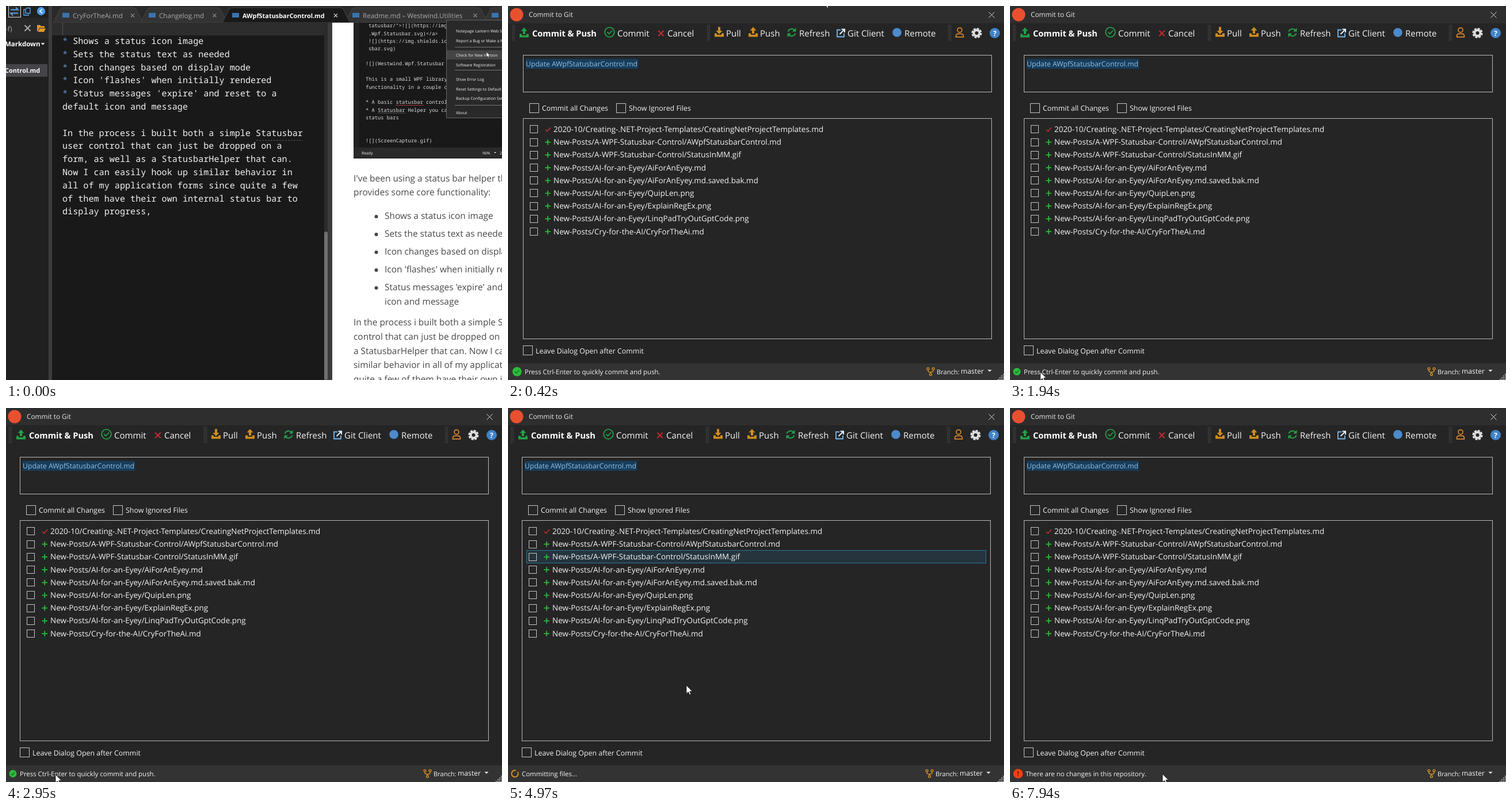
These frames come from a looping animation (862 px wide and 650 px high, 8000 ms). An HTML page:

```html
<!DOCTYPE html>
<html lang="en">
<head>
<meta charset="utf-8">
<title>Commit dialog</title>
<style>
  html, body { margin: 0; width: 100%; height: 100%; overflow: hidden; background: #252525; }
  svg { display: block; width: 100vw; height: 100vh; }
  text { font-family: "Open Sans", "Noto Sans", sans-serif; text-rendering: geometricPrecision; white-space: pre; }
  .mono { font-family: "Noto Sans Mono", "DejaVu Sans Mono", monospace; }
  .bold { font-weight: 700; }
</style>
</head>
<body>
<svg id="stage" viewBox="0 0 862 650"></svg>
<script>
const escapeText = s => s.replace(/&/g, '&amp;').replace(/</g, '&lt;');
const text = (x, y, s, size, fill = '#f4f4f4', cls = '') =>
  `<text x="${x}" y="${y}" font-size="${size}" fill="${fill}" class="${cls}">${escapeText(s)}</text>`;
const rect = (x, y, w, h, fill, extra = '') =>
  `<rect x="${x}" y="${y}" width="${w}" height="${h}" fill="${fill}" ${extra}/>`;
const frame = (x, y, w, h, stroke, fill = 'none') => rect(x + .5, y + .5, w, h, fill, `stroke="${stroke}"`);
const circle = (x, y, r, fill, extra = '') => `<circle cx="${x}" cy="${y}" r="${r}" fill="${fill}" ${extra}/>`;
const fillPath = (d, fill) => `<path d="${d}" fill="${fill}"/>`;
const line = (d, stroke, width = 1) => `<path d="${d}" fill="none" stroke="${stroke}" stroke-width="${width}"/>`;
const at = (x, y, s) => `<g transform="translate(${x} ${y})">${s}</g>`;
const cross = (x, y, r, stroke, width) =>
  line(`M${x - r} ${y - r}l${2 * r} ${2 * r}m0 ${-2 * r}l${-2 * r} ${2 * r}`, stroke, width);
const dropArrow = (x, y, r = 3.5, fill = '#eee') => fillPath(`M${x - r} ${y - r / 2}h${2 * r}l${-r} ${r}z`, fill);
const POINTER = 'M0 0V14.5L3.4 11.4L5.7 16.4L8 15.4L5.8 10.6H10.3Z';
const pointer = `<path d="${POINTER}" fill="#fff" stroke="#111" stroke-width=".8"/>`;

function editorWindow() {
  const tab = (x, w, label, labelX, closeX, active) =>
    `<path d="M${x - 8} 29L${x + 3} 7Q${x + 5} 3 ${x + 9} 3H${x + w - 9}Q${x + w - 5} 3 ${x + w - 3} 7L${x + w + 8} 29Z"
      fill="${active ? '#191919' : '#333'}" stroke="#484848"/>` +
    rect(labelX - 18, 12, 12, 8, '#3974ae') +
    text(labelX, 20.5, label, active ? 10.9 : 11.6, active ? '#fff' : '#aaa', active ? 'bold' : '') +
    (closeX ? cross(closeX, 16.5, 3, active ? '#ccc' : '#888', 1.2) : '');

  const sidebar =
    rect(0, 0, 74, 650, '#202020') + rect(0, 21, 74, 36, '#292929') + rect(74, 0, 6, 650, '#3c3c3c') +
    frame(4, -3, 21, 22, '#ddd', '#2b2b2b') +
    line('M8 6.5H21l-4-4M21 12.5H8l4 4', '#58a6f0', 1.8) +
    line('M36 3.5h6v9h-8v-7zM33 6h-2v10h8v-2', '#58a6f0', 1.3) +
    circle(61, 9, 7.2, '#4c9bea') + line('M63 5.5L59 9l4 3.5', '#fff', 1.6) +
    text(-1, 44, '-f)', 12, '#aaa') + cross(37.5, 38.5, 5, '#aaa', 2) +
    fillPath('M54 33h5l2 2h6v3h-9l-3 6h-1zM58.5 39H69l-3 6H55.5z', '#dc9a27') +
    text(-2, 70, 'Markdown', 11.5, '#fff', 'bold') + dropArrow(64, 66) +
    rect(0, 101, 72, 22, '#454549') + text(-2, 116, 'Control.md', 10.9, '#fff', 'bold');

  const tabs = rect(80, 0, 782, 29, '#292929') +
    tab(90, 140, 'CryForTheAi.md', 116, 220) + tab(242, 134, 'Changelog.md', 266, 362.5) +
    tab(597, 232, 'Readme.md – Westwind.Utilities', 620, 815.5) + tab(838, 90, '', 862) +
    tab(384, 206, 'AWpfStatusbarControl.md', 411, 573, true);

  const source = [
    '* Shows a status icon image', '* Sets the status text as needed',
    '* Icon changes based on display mode', "* Icon 'flashes' when initially rendered",
    "* Status messages 'expire' and reset to a", 'default icon and message', '',
    'In the process i built both a simple Statusbar', 'user control that can just be dropped on a',
    'form, as well as a StatusbarHelper that can.', 'Now I can easily hook up similar behavior in',
    'all of my application forms since quite a few', 'of them have their own internal status bar to',
    'display progress,'];
  const code = rect(80, 29, 474, 621, '#191919') + rect(80, 29, 473, 22, '#2d2d2d') + rect(98, 29, 1, 22, '#555') +
    source.map((s, i) => {
      const y = 66 + i * 22.8, bullet = s[0] === '*';
      return (bullet ? text(98, y, '*', 15.15, '#6590c5', 'mono') : '') +
        text(bullet ? 116.2 : 98, y, bullet ? s.slice(2) : s, 15.15, '#f2f2f2', 'mono');
    }).join('') +
    `<path d="M435 233.5h81" stroke="#685050" stroke-dasharray="3 2"/>` +
    rect(553, 29, 14, 621, '#2b2b2b') + rect(553, 392, 6, 258, '#707070', 'rx="3"') + rect(559, 29, 8, 621, '#3b3b3b');

  const shot = rect(604, 29, 258, 236, '#191919') + rect(604, 29, 10, 217, '#222') + rect(604, 246, 258, 18, '#2a2a2a') +
    [[37, 'tatusbar/">![](https://img'], [51, '.Wpf.Statusbar.svg)</a>'], [64, '![](https://img.shields.io'],
     [77, 'sbar.svg)'], [103, '![](Westwind.Wpf.Statusbar'], [130, 'This is a small WPF library'],
     [143.5, 'functionality in a couple of'], [170, '* A basic statusbar control'],
     [183.5, '* A Statusbar Helper you can'], [196.5, 'status bars'], [236.5, '![](ScreenCapture.gif)']]
      .map(([y, s]) => text(y < 60 || y === 64 || y === 77 ? 630 : 625, y, s, 8.75, '#ddd', 'mono')).join('') +
    line('M677 172.5h49', '#a33') + line('M646 186h48', '#555') +
    text(618, 257.5, 'Ready', 6.8) + text(828, 257.5, '96%', 6.8) + dropArrow(850, 255, 2) + text(858, 257.5, '23', 6.8) +
    frame(765, 24, 110, 170, '#666', '#292929') + rect(766, 77, 96, 16, '#454545') +
    [71, 111, 172].map(y => rect(780, y, 82, 1, '#777')).join('') +
    [[43, 'Notepage Lantern Web Site'], [60, 'Report a Bug or Make a Request'], [85, 'Check for New Version'],
     [101.5, 'Software Registration'], [127, 'Show Error Log'], [143.5, 'Reset Settings to Default'],
     [160, 'Backup Configuration Settings'], [185, 'About']]
      .map(([y, s]) => text(782, y + 3, s, 6.9)).join('') +
    `<g transform="translate(835 80) scale(.6)">${pointer}</g>`;

  const prose = (x, y, s) => text(x, y + 5.3, s, 15.45, '#484848');
  const bullets = ['Shows a status icon image', 'Sets the status text as needed', 'Icon changes based on display mode',
    "Icon 'flashes' when initially rendered", "Status messages 'expire' and reset"];
  const preview = rect(567, 29, 295, 621, '#fff') + shot +
    prose(604, 300, "I've been using a status bar helper that") + prose(604, 324, 'provides some core functionality:') +
    bullets.map((s, i) => circle(643.5, 366 + i * 31, 3, '#444') + prose(658, 365 + i * 31, s)).join('') +
    prose(658, 513.5, 'icon and message') +
    ['In the process i built both a simple Statusbar', 'control that can just be dropped on a form',
     'a StatusbarHelper that can. Now I can', 'similar behavior in all of my application',
     'quite a few of them have their own internal']
      .map((s, i) => prose(604, 550 + i * 24.6, s)).join('');
  return sidebar + tabs + code + preview;
}

const rowY = i => 214.3 + i * 22.2;
const files = ['2020-10/Creating-.NET-Project-Templates/CreatingNetProjectTemplates.md',
  'New-Posts/A-WPF-Statusbar-Control/AWpfStatusbarControl.md', 'New-Posts/A-WPF-Statusbar-Control/StatusInMM.gif',
  'New-Posts/AI-for-an-Eyey/AiForAnEyey.md', 'New-Posts/AI-for-an-Eyey/AiForAnEyey.md.saved.bak.md',
  'New-Posts/AI-for-an-Eyey/QuipLen.png', 'New-Posts/AI-for-an-Eyey/ExplainRegEx.png',
  'New-Posts/AI-for-an-Eyey/LinqPadTryOutGptCode.png', 'New-Posts/Cry-for-the-AI/CryForTheAi.md'];

function toolbar() {
  const green = '#23a047', amber = '#cf8d1e';
  const tray = 'M-8 2h4v2.5h8V2h4v6H-8z';
  const upload = c => fillPath('M0-9l5.5 6H2v5.5h-4V-3h-3.5z' + tray, c);
  const download = c => fillPath('M0 3.5l-5.5-6H-2V-9h4v6.5h3.5z' + tray, c);
  const grip = x => `<path d="M${x} 33v28m2-27v27m2-28v28" stroke="#686868" stroke-dasharray="1 2"/>`;
  const label = (x, s) => text(x, 52.5, s, 15);
  return [5.5, 344.5, 763.5].map(grip).join('') +
    at(26, 46.5, upload(green)) + text(40, 52.5, 'Commit & Push', 14.6, '#fff', 'bold') +
    circle(174.5, 45.5, 8.3, 'none', `stroke="${green}" stroke-width="1.8"`) +
    line('M170.5 45.5l3 3 5.5-6', green, 1.8) + label(188, 'Commit') +
    cross(264, 47.5, 4.7, '#c42b30', 2) + label(275, 'Cancel') +
    at(365, 45.5, download(amber)) + label(377, 'Pull') +
    at(424, 45.5, upload(amber)) + label(436, 'Push') +
    at(491, 46, line('M-6.5-1.5A6.8 6.8 0 0 1 5-4M6.5 1.5A6.8 6.8 0 0 1-5 4', green, 2) +
      fillPath('M7.5-8v6.5H1zM-7.5 8V1.5H-1z', green)) + label(504, 'Refresh') +
    line('M576 41.5h-6v12h12v-6', '#79b8ee', 1.8) + line('M574.5 49l8-8M577.5 40.5h5.5V46', '#e4f1fc', 2) +
    label(588, 'Git Client') + circle(674, 46, 7.8, '#4c8bcc') + label(687, 'Remote') +
    circle(783, 41.8, 4, 'none', 'stroke="#d9862d" stroke-width="1.7"') +
    line('M776.5 53.8v-1q0-4.5 4-4.5h5q4 0 4 4.5v1z', '#d9862d', 1.7) +
    circle(812.5, 47, 7.4, 'none', 'stroke="#ddd" stroke-width="3.4" stroke-dasharray="3.9 1.9"') +
    circle(812.5, 47, 5, 'none', 'stroke="#ddd" stroke-width="4"') +
    circle(844, 47, 9, '#3f83c9') + text(841, 51.5, '?', 12.5, '#fff', 'bold');
}

function dialogBody() {
  const border = '#b8b8b8';
  const check = (x, y, size) => frame(x, y, size, size, '#c4c4c4');
  const rows = files.map((s, i) => {
    const y = rowY(i);
    const mark = i ? line(`M62.5 ${y + .2}h9.5M67.2 ${y - 4.6}v9.5`, '#2cbc3a', 1.7)
                   : line(`M63 ${y + .5}l3 3 6-6.5`, '#c03030', 1.6);
    return check(36, Math.round(y) - 7, 13) + mark + text(77, y + 4.7, s, 13.47);
  }).join('');
  return frame(24, 85, 814, 64, border) + rect(29, 92, 195, 17, '#173d5c') +
    text(29, 104.7, 'Update AWpfStatusbarControl.md', 12.23, '#94bfe4') +
    check(35, 169, 16) + text(57, 181.7, 'Commit all Changes', 12.4) +
    check(186, 169, 16) + text(208, 181.7, 'Show Ignored Files', 12.4) +
    frame(24, 195, 814, 383, border) + rows +
    check(24, 590, 16) + text(46, 603.7, 'Leave Dialog Open after Commit', 12.4) +
    line('M728 632v1.5q0 3 4.5 3t4.5-3V632M732.5 636v3', '#d28f22', 1.5) +
    [[728, 630.3], [737, 630.3], [732.5, 640.3]].map(([x, y]) =>
      circle(x, y, 1.9, 'none', 'stroke="#d28f22" stroke-width="1.4"')).join('') +
    text(743, 639.8, 'Branch:', 11.1) + text(785, 639.3, 'master', 12.2) + dropArrow(835, 634);
}

function dialogChrome() {
  let dots = '';
  for (let i = 0; i < 4; i++) for (let j = 0; j <= i; j++) dots += rect(860 - j * 3, 639 + i * 3, 2, 2, '#a0a0a0');
  return rect(0, 0, 862, 650, '#252525') + rect(0, 0, 862, 30, '#2e2e2e') + rect(0, 621, 862, 29, '#333') + dots +
    circle(15, 15, 11.5, '#e9502f') + text(36, 19, 'Commit to Git', 11.8, '#e6e6e6') + cross(840.5, 15.5, 5, '#ddd', 1);
}

const tick = r => line(`M${-r * .45} 0l${r * .3} ${r * .35} ${r * .6}-${r * .7}`, '#173', 1.6);
const status = (iconX, icon, textX, s) => at(iconX, 635.5, icon) + text(textX, 640, s, 11.43);
const hint = 'Press Ctrl-Enter to quickly commit and push.';
function statusBar(t) {
  if (t < 1520) return status(13.7, circle(0, 0, 8, '#2cbc3a') + tick(8), 27, hint);
  if (t < 4620) return status(12, circle(0, 0, 6.5, '#2cbc3a') + tick(6.5), 24, hint);
  if (t < 7150) {
    const ring = `<g transform="rotate(${t * .36 % 360})">${line('M2.5-5.2A5.8 5.8 0 1 0 5.4-2', '#d08f25', 2)}</g>`;
    return status(12, ring, 24, 'Committing files...');
  }
  return status(14, circle(0, 0, 8.3, '#f2430f') + rect(-.9, -4.5, 1.8, 5.5, '#5a1a08') + rect(-.9, 2.5, 1.8, 1.8, '#5a1a08'),
    27, 'There are no changes in this repository.');
}

// time, x, y of the pointer tip
const path = [[0, 545, -25], [420, 549, -13], [860, 150, 48], [930, 132, 48], [1200, 130, 52], [1350, 144, 82],
  [1500, 130, 330], [1720, 90, 630], [2050, 40, 638], [2300, 150, 575], [2590, 95, 634], [2950, 86, 637],
  [3080, 86, 637], [3390, 125, 52], [3680, 150, 50], [3900, 150, 50], [4180, 215, 52], [4530, 215, 52],
  [4820, 262, 258], [4970, 310, 482], [5330, 118, 636], [5500, 119, 631], [6510, 119, 631], [7080, 245, 575],
  [7500, 345, 610], [7800, 265, 636], [8000, 265, 636]];
function pointerAt(t) {
  const i = Math.max(1, path.findIndex(k => k[0] >= t));
  const [t0, x0, y0] = path[i - 1], [t1, x1, y1] = path[i];
  const k = Math.max(0, (t - t0) / (t1 - t0)), e = k * k * (3 - 2 * k);
  return [x0 + (x1 - x0) * e, y0 + (y1 - y0) * e];
}

// Hover feedback trails the pointer
function hover(t) {
  const [x, y] = pointerAt(Math.max(0, t - 150));
  if (y >= 31 && y <= 61) {
    const button = [[11, 147], [159, 91]].find(([left, w]) => x >= left && x < left + w);
    return button ? frame(button[0], 31, button[1], 29, '#4e7892', '#343f49') : '';
  }
  const row = Math.round((y - rowY(0)) / 22.2);
  return row >= 0 && row < files.length ? frame(32, Math.round(rowY(row)) - 12, 798, 22, '#28779a', '#25343d') : '';
}

const stage = document.getElementById('stage');
stage.innerHTML = `<g id="editor">${editorWindow()}</g><g id="dialog">${dialogChrome()}
  <g id="body"><g id="hover"></g>${toolbar()}${dialogBody()}<g id="status"></g></g>
  <g id="pointer">${pointer}</g></g>`;
const part = id => document.getElementById(id);

function draw() {
  const t = performance.now() % 8000, open = t >= 140;
  part('editor').style.display = open ? 'none' : '';
  part('dialog').style.display = open ? '' : 'none';
  part('body').setAttribute('transform', `translate(${t < 640 ? 2 : 0} 0)`);
  part('hover').innerHTML = hover(t);
  part('status').innerHTML = statusBar(t);
  part('pointer').setAttribute('transform', `translate(${pointerAt(t).join(' ')})`);
  requestAnimationFrame(draw);
}
draw();
</script>
</body>
</html>
```
